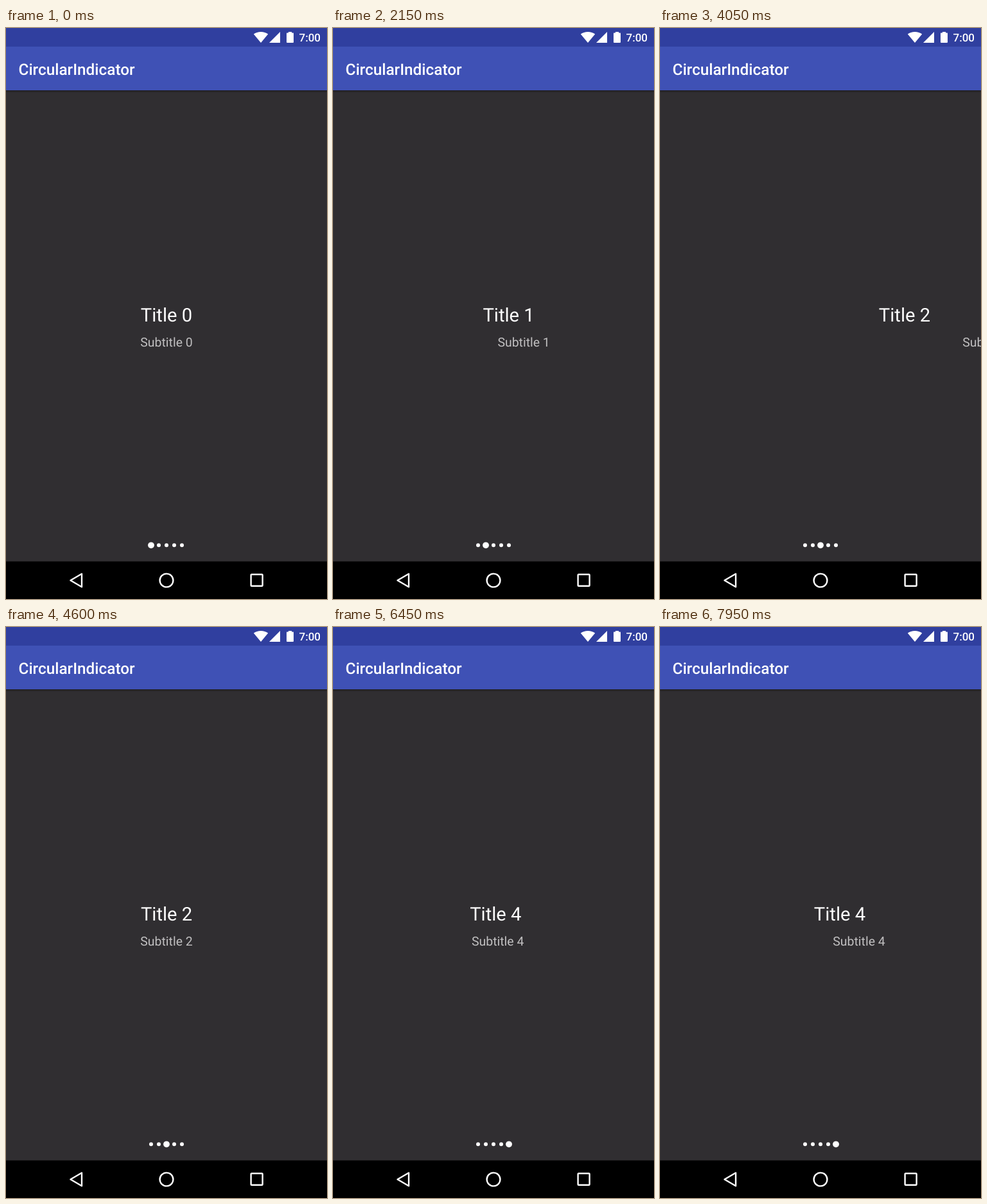
Recreate the animation shown at these times as an HTML page. Size 500x889 px, loop 8 s.

```html
<!DOCTYPE html>
<html lang="en">
<head>
<meta charset="utf-8">
<title>CircularIndicator</title>
<style>
html, body { margin: 0; height: 100%; overflow: hidden; background: #302e31; }
svg { display: block; width: 100vw; height: 100vh; }
text { font-family: Roboto, sans-serif; fill: #fff; text-rendering: geometricPrecision; }
.bar { font-weight: 500; }
.title, .sub { text-anchor: middle; }
.title { font-size: 29.2px; }
.sub { font-size: 19.46px; fill: #c1c0c1; }
</style>
</head>
<body>
<svg viewBox="0 0 500 889">
  <defs>
    <linearGradient id="shade" x2="0" y2="1">
      <stop stop-color="#000" stop-opacity=".35"/>
      <stop offset="1" stop-color="#000" stop-opacity="0"/>
    </linearGradient>
  </defs>
  <rect width="500" height="889" fill="#302e31"/>
  <g id="pages"></g>
  <g id="dots" fill="#fff"></g>
  <rect y="97" width="500" height="4" fill="url(#shade)"/>
  <rect y="29" width="500" height="68" fill="#3f51b5"/>
  <rect width="500" height="29" fill="#303f9f"/>
  <rect y="830.5" width="500" height="59"/>
  <g fill="#fff">
    <path d="M397 23 385.8 9.6Q390.5 6 397 6T408.2 9.6Z"/>
    <path d="M410 23 427 6V23Z"/>
    <path d="M440 6h5v1.6h2q1 0 1 1V22q0 1-1 1h-9q-1 0-1-1V8.6q0-1 1-1h2Z"/>
  </g>
  <text class="bar" x="456.5" y="21.3" font-size="17">7:00</text>
  <text class="bar" x="19.5" y="72.8" font-size="24.33">CircularIndicator</text>
  <g fill="none" stroke="#fff" stroke-width="2.4" stroke-linejoin="round">
    <path d="M118 849.8V870.2L100.5 860Z"/>
    <circle cx="250" cy="860" r="10.4"/>
    <rect x="381.6" y="850.8" width="18" height="18" rx="1"/>
  </g>
</svg>
<script>
const PAGES = 5, WIDTH = 500, LOOP = 8000, STEP = 50;

// Finger drags: [time, scroll position] points; a drag with "settle" then glides to a page.
const drags = [
  { points: [[1050, 0], [1500, 123], [1960, 243]], settle: [2460, 500] },
  { points: [[2750, 500], [3050, 655], [3350, 724], [3620, 750], [4050, 869], [4200, 874]], settle: [4680, 1000] },
  { points: [[5300, 1000], [5450, 1130]], settle: [5810, 1500] },
  { points: [[6050, 1500], [6200, 1630]], settle: [6610, 2000] },
  { points: [[6950, 2000], [7200, 1820], [7400, 1778], [7600, 1824], [7800, 1906], [7950, 1970], [8000, 1986]] }
];

const clamp = v => Math.max(0, Math.min(1, v));

// Cubic curve through the points, flat at turning points.
function follow(pts, t) {
  const slope = i => (pts[i + 1][1] - pts[i][1]) / (pts[i + 1][0] - pts[i][0]);
  const tangent = i => {
    if (i === 0) return slope(0);
    if (i === pts.length - 1) return slope(i - 1);
    const a = slope(i - 1), b = slope(i);
    return a * b > 0 ? 2 * a * b / (a + b) : 0;
  };
  let i = 0;
  while (i < pts.length - 2 && t > pts[i + 1][0]) i++;
  const [t0, p0] = pts[i], [t1, p1] = pts[i + 1];
  const d = t1 - t0, u = (t - t0) / d, v = 1 - u;
  return p0 * (1 + 2 * u) * v * v + p1 * (3 - 2 * u) * u * u
    + d * u * v * (tangent(i) * v - tangent(i + 1) * u);
}

function scrollAt(t) {
  const drag = drags.filter(d => d.points[0][0] <= t).pop();
  if (!drag) return 0;
  const [start, from] = drag.points[drag.points.length - 1];
  if (t <= start) return follow(drag.points, t);
  const [end, to] = drag.settle;
  return to + (from - to) * (1 - clamp((t - start) / (end - start))) ** 5;
}

function add(parent, tag, attrs, label = "") {
  const el = document.createElementNS("http://www.w3.org/2000/svg", tag);
  for (const k in attrs) el.setAttribute(k, attrs[k]);
  el.textContent = label;
  return document.getElementById(parent).appendChild(el);
}

const items = Array.from({ length: PAGES }, (_, i) => ({
  title: add("pages", "text", { class: "title", y: 457.3 }, "Title " + i),
  sub: add("pages", "text", { class: "sub", y: 496 }, "Subtitle " + i),
  dot: add("dots", "circle", { cx: 226 + 12 * i, cy: 805.3 })
}));

function draw(now) {
  const t = Math.floor(now % LOOP / STEP) * STEP;
  const scroll = scrollAt(t);
  items.forEach(({ title, sub, dot }, i) => {
    const offset = i * WIDTH - scroll;
    title.setAttribute("x", 250 + offset);
    sub.setAttribute("x", 250 + 2 * offset); // subtitles slide twice as fast
    dot.setAttribute("r", 3 + 1.9 * clamp((0.55 - Math.abs(offset) / WIDTH) * 10));
  });
}

const begin = performance.now();
function tick() {
  draw(performance.now() - begin);
  requestAnimationFrame(tick);
}
tick();
</script>
</body>
</html>
```
